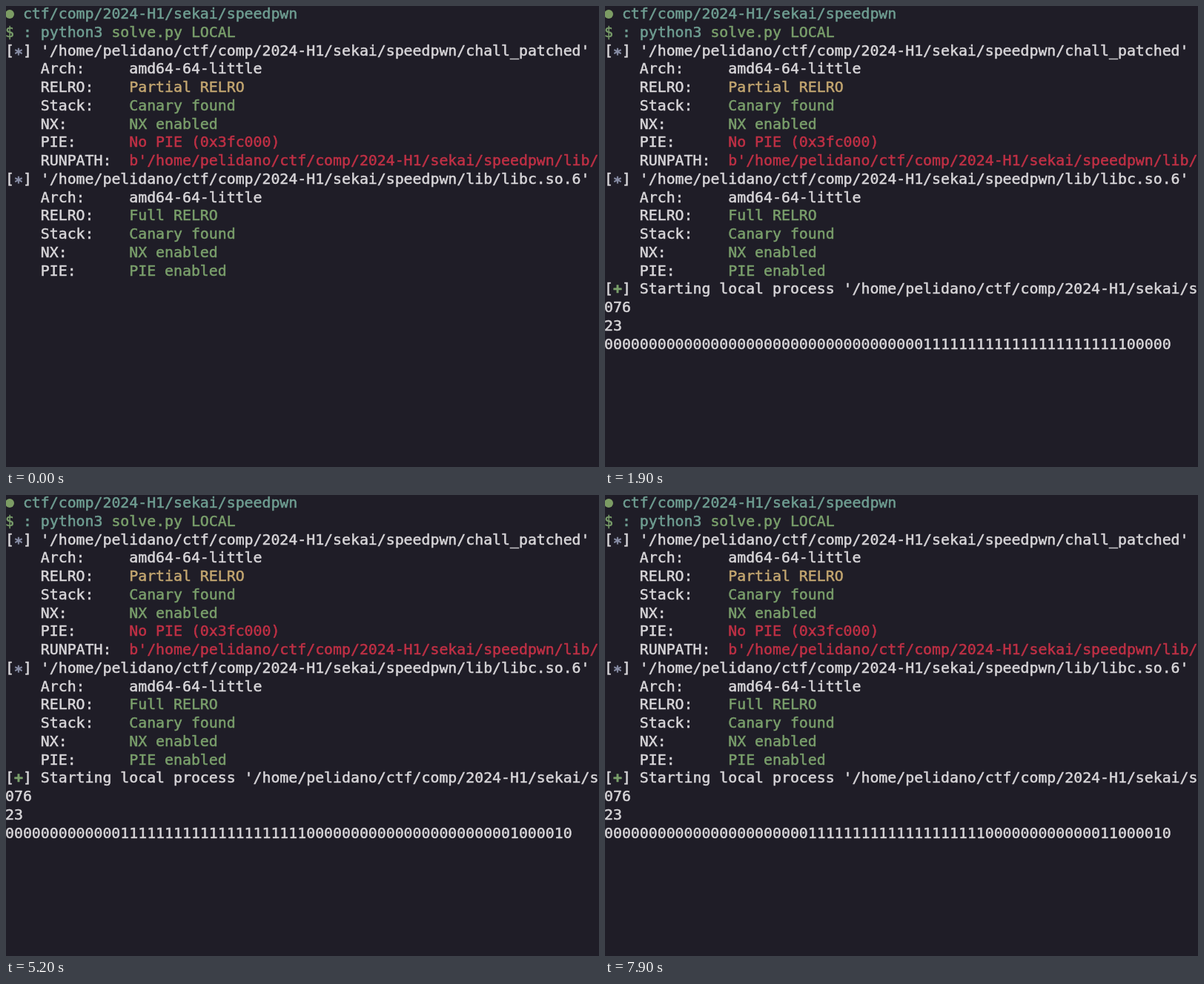
Recreate the animation shown at these times as an HTML page. Size 800x622 px, loop 8000 ms.

```html
<!DOCTYPE html>
<html lang="en">
<head>
<meta charset="utf-8">
<title>Terminal</title>
<style>
  html, body {
    margin: 0;
    width: 100%;
    height: 100%;
    overflow: hidden;
    background: #1f1d27;
  }
  main {
    position: relative;
    width: 100%;
    height: 100%;
    overflow: hidden;
    contain: strict;
  }
  pre {
    position: absolute;
    left: -1px;
    top: -1px;
    margin: 0;
    color: #d8d6d9;
    font: 19.85px/24.77px "DejaVu Sans Mono", monospace;
    font-variant-ligatures: none;
    -webkit-text-stroke: 0.5px;
  }
  .dot {
    position: absolute;
    left: -1px;
    top: 5px;
    width: 12px;
    height: 12px;
    border-radius: 50%;
    background: #7c9c64;
  }
  .aqua { color: #6f9e92; }
  .green { color: #7a9f6b; }
  .yellow { color: #c3a670; }
  .red { color: #c03045; }
  .star { color: #8a90a8; font-weight: bold; position: relative; top: 4px; }
  .plus { color: #7a9f6b; font-weight: bold; }
</style>
</head>
<body>
<main>
<div class="dot"></div>
<pre>  <span class="aqua">ctf/comp/2024-H1/sekai/speedpwn</span>
<span class="green">$</span> <span class="aqua">: python3</span> <span class="green">solve.py LOCAL</span>
[<span class="star">*</span>] '/home/pelidano/ctf/comp/2024-H1/sekai/speedpwn/chall_patched'
    Arch:     amd64-64-little
    RELRO:    <span class="yellow">Partial RELRO</span>
    Stack:    <span class="green">Canary found</span>
    NX:       <span class="green">NX enabled</span>
    PIE:      <span class="red">No PIE (0x3fc000)</span>
    RUNPATH:  <span class="red">b'/home/pelidano/ctf/comp/2024-H1/sekai/speedpwn/lib/</span>
[<span class="star">*</span>] '/home/pelidano/ctf/comp/2024-H1/sekai/speedpwn/lib/libc.so.6'
    Arch:     amd64-64-little
    RELRO:    <span class="green">Full RELRO</span>
    Stack:    <span class="green">Canary found</span>
    NX:       <span class="green">NX enabled</span>
    PIE:      <span class="green">PIE enabled</span>
<span id="start">[<span class="plus">+</span>] Starting local process '/home/pelidano/ctf/comp/2024-H1/sekai/s</span>
<span id="output">076
23
<span id="bits"></span></span></pre>
</main>
<script>
const LOOP = 8000, TICK = 100, WIDTH = 64, ONES = 23;
const FOUND = [62, 57, 56]; // set bits, in the order the search finds them

// [time, number of guesses made]
const PACE = [[100, 0], [700, 13], [1900, 36], [3100, 57], [5200, 93], [6800, 116], [7900, 140]];

const [start, output, bits] = ["start", "output", "bits"].map(id => document.getElementById(id));

function guessesAt(t) {
  const i = Math.max(1, PACE.findIndex(([time]) => time >= t));
  const [[t0, n0], [t1, n1]] = [PACE[i - 1], PACE[i]];
  return Math.round(n0 + (n1 - n0) * (t - t0) / (t1 - t0));
}

// Each pass slides a block of ones up until it passes the next set bit.
function guess(n) {
  let pass = 0;
  for (; pass < FOUND.length; pass++) {
    const top = Math.min(FOUND[pass] + 1, (FOUND[pass - 1] ?? WIDTH) - 1);
    const steps = top - (ONES - pass) + 2;
    if (n < steps) break;
    n -= steps;
  }
  const known = FOUND.slice(0, pass), end = n + ONES - pass;
  return Array.from({ length: WIDTH }, (_, i) =>
    (i >= n && i < end) || known.includes(i) ? 1 : 0).join("");
}

function draw() {
  const t = Math.floor(performance.now() % LOOP / TICK) * TICK;
  start.style.visibility = t >= 100 ? "visible" : "hidden";
  output.style.visibility = t >= 200 ? "visible" : "hidden";
  bits.textContent = guess(guessesAt(Math.max(t, 100)));
  requestAnimationFrame(draw);
}
draw();
</script>
</body>
</html>
```
